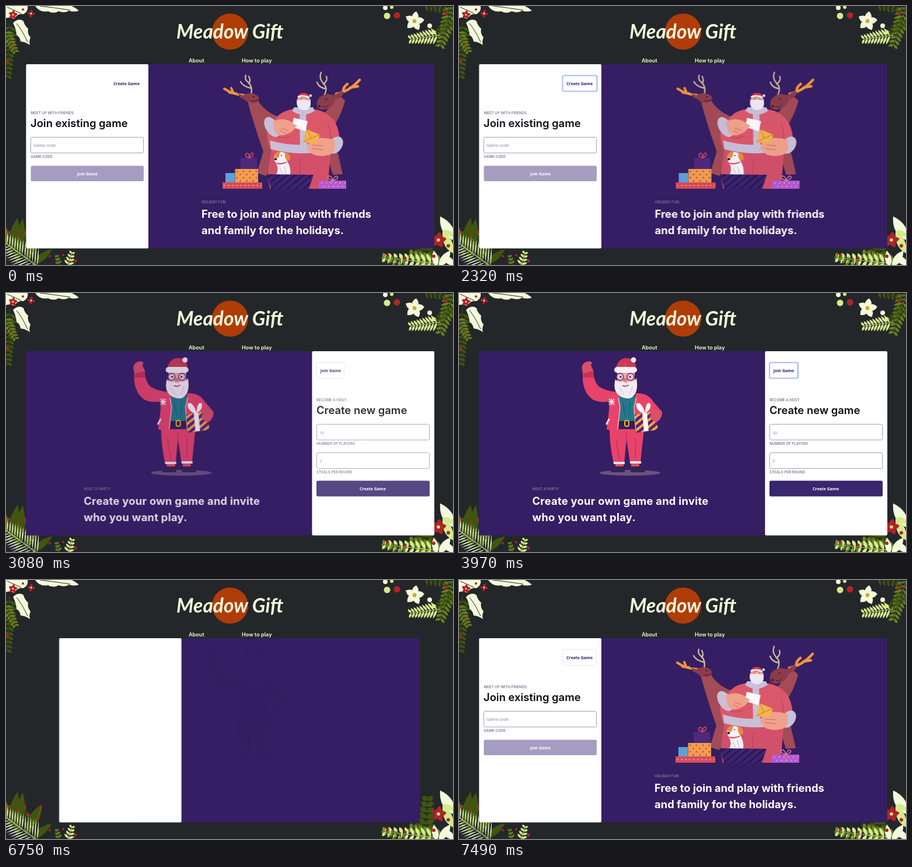
These frames come from a looping animation (766 by 445 pixels, 8420 ms). An HTML page:

```html
<!DOCTYPE html>
<html lang="en">
<head>
<meta charset="utf-8">
<title>Gift game</title>
<style>
html, body { margin: 0; width: 100%; height: 100%; overflow: hidden; background: #242729; }
svg { display: block; width: 766px; height: 445px; }
text { font-family: Inter, sans-serif; }
.nav { font-size: 9.1px; font-weight: 600; fill: #f3fadb; }
.brand { font: italic 700 33.6px Lato, cursive; fill: #f5fadc; }
.tag { font-size: 6.2px; font-weight: 600; fill: #7f7a94; }
.head { font-size: 18.4px; font-weight: 600; fill: #0b0a10; }
.hero { font-size: 18.4px; font-weight: 700; fill: #fff; }
.hero.wide { letter-spacing: .25px; }
.btn { font: 700 7px "Noto Sans", sans-serif; text-anchor: middle; fill: #2f1d63; }
.btn.on { fill: #fff; }
.val { font: 7.2px "Noto Sans", sans-serif; fill: #8a8499; }
.field { fill: #fff; stroke: #a39eb5; }
.edge { fill: none; stroke: #e6e4ee; }
.ring { fill: none; stroke: #a9bbfa; stroke-width: 2; }

.panel { animation: slide 8420ms cubic-bezier(.15,0,.1,1) infinite; }
.white { --to: 490px; }
.purple { --to: -210px; }
.join, .create { --in: 0px; --out: 0px; animation: join 8420ms cubic-bezier(0,0,.2,1) infinite; }
.create { animation-name: create; }
.art { --in: 50px; --out: 50px; }
.create.art { --out: -50px; }
.edge.first { animation: edge 8420ms linear infinite; }
.ring { animation: ring1 8420ms linear infinite; }
.ring.second { animation-name: ring2; }

@keyframes slide {
  0%, 27.553% { transform: translateX(0); }
  36.01%, 75.57% { transform: translateX(var(--to)); }
  84.027%, 100% { transform: translateX(0); }
}
@keyframes join {
  0%, 27.553% { opacity: 1; transform: translateX(0); }
  32.66% { opacity: 0; transform: translateX(var(--out)); }
  80.309% { opacity: 0; transform: translateX(var(--in)); }
  88.741%, 100% { opacity: 1; transform: translateX(0); }
}
@keyframes create {
  0%, 32.28% { opacity: 0; transform: translateX(var(--in)); }
  40.713%, 75.57% { opacity: 1; transform: translateX(0); }
  80.677%, 100% { opacity: 0; transform: translateX(var(--out)); }
}
@keyframes edge { 0%, 6.295% { opacity: 0; } 8.67%, 100% { opacity: 1; } }
@keyframes ring1 { 0%, 6.295% { opacity: 0; } 8.67%, 50% { opacity: 1; } 50.01%, 100% { opacity: 0; } }
@keyframes ring2 { 0%, 45.487% { opacity: 0; } 47.15%, 90% { opacity: 1; } 90.01%, 100% { opacity: 0; } }
</style>
</head>
<body>
<svg viewBox="0 0 766 445">
  <defs>
    <pattern id="dots" width="11" height="11" patternUnits="userSpaceOnUse" x="393" y="281">
      <path fill="#f0a04b" d="M0 0h11v11H0z"/><circle cx="3" cy="3" r="1.6" fill="#d64a5e"/><circle cx="8.5" cy="8.5" r="1.6" fill="#d64a5e"/>
    </pattern>
    <pattern id="stripes" width="9" height="9" patternUnits="userSpaceOnUse" patternTransform="rotate(50)">
      <path fill="#f3b21f" d="M0 0h9v9H0z"/><path fill="#5a1f8f" d="M0 0h5v9H0z"/>
    </pattern>
    <pattern id="wrap" width="9" height="9" patternUnits="userSpaceOnUse" patternTransform="rotate(50)">
      <path fill="#3d2470" d="M0 0h9v9H0z"/><path fill="#271550" d="M0 0h2.5v9H0z"/>
    </pattern>
  </defs>

  <g id="plants"></g>
  <path d="M34.5 100V417M733.5 100V417" stroke="#2d302b"/>
  <circle cx="384" cy="44" r="31" fill="#b03c08"/>
  <text class="brand" x="292" y="56">Meadow Gift</text>
  <text class="nav" x="313" y="97">About</text>
  <text class="nav" x="404" y="97">How to play</text>

  <g class="panel purple">
    <rect x="244" y="100" width="489.600" height="316.600" rx="2" fill="#351e63"/>

    <g class="join art">
      <!-- antlers -->
      <g fill="none" stroke-linecap="round" stroke-width="2.4">
        <path stroke="#c9b49c" d="M420 153Q423 138 415 131Q408 126 411 119M416 133Q420 128 416 121M419 141Q406 138 402 130"/>
        <path stroke="#ef9440" stroke-width="4" d="M408 153Q390 153 374 142M394 150L383 149M389 148L386 141"/>
        <path stroke="#c9b49c" d="M546 152Q552 140 543 132Q536 124 540 114M544 134Q552 128 549 121M547 142Q536 140 533 131"/>
        <path stroke="#ef9440" stroke-width="4.5" d="M566 151Q588 147 606 127M578 146Q578 139 585 134M590 140L603 138"/>
      </g>
      <!-- reindeer -->
      <path fill="#a34b57" d="M413 160L432 163Q443 181 466 190L458 262L446 292L430 287L441 250Q425 205 413 160Z"/>
      <path fill="#8b3c4a" d="M398 150Q405 156 412 151Q424 147 433 156Q435 165 424 167Q412 166 408 160Q399 158 398 150Z"/>
      <path fill="#a34b57" d="M557 158Q572 150 581 163Q574 190 558 212L570 258L577 289L560 290L545 240L538 188Q550 182 553 174Z"/>
      <path fill="#8b3c4a" d="M533 165Q535 154 551 151Q561 154 565 152Q574 145 579 148Q576 158 565 160Q561 174 549 177Q536 180 533 173Z"/>
      <g fill="#32182f"><circle cx="424" cy="156" r="1.2"/><circle cx="549" cy="160" r="1.3"/><circle cx="537" cy="172" r="2"/></g>
      <path fill="none" stroke="#32182f" d="M420 163Q427 165 432 161M542 173Q549 175 553 170"/>
      <!-- large figure -->
      <path fill="#d2506a" d="M455 244L448 290L452 314H551L557 244Z"/>
      <path fill="#db586b" d="M493 177Q470 180 459 197L447 218Q449 242 456 250H566Q578 225 563 198Q550 180 526 177Z"/>
      <path fill="none" stroke="#b83d59" d="M551 202Q558 217 555 233M462 224Q474 229 487 224M505 262Q502 285 504 313"/>
      <path fill="#c9bfd8" d="M452 231Q503 246 561 231L563 245Q510 261 454 246Z"/>
      <path fill="#c9bfd8" d="M503 181h11l2 64h-12z"/>
      <path fill="#c9bfd8" d="M490 180Q509 194 529 180L526 174H494Z"/>
      <path fill="#f0a18b" d="M500 157h20v14h-20z"/>
      <path fill="#eee8f3" d="M499 159Q500 164 504 161H516Q520 165 521 158Q526 179 510 179Q495 177 499 159Z"/>
      <path fill="#d23b4e" d="M500 156Q503 147 515 150L522 155Z"/>
      <path fill="none" stroke="#f4f0f6" stroke-width="3" stroke-linecap="round" d="M501 156Q510 153 519 157"/>
      <circle cx="522" cy="154" r="2.2" fill="#f4f0f6"/>
      <g fill="#32182f"><circle cx="506" cy="160" r=".8"/><circle cx="515" cy="160" r=".8"/></g>
      <ellipse cx="456" cy="208" rx="11" ry="19" transform="rotate(-32 456 208)" fill="#c9bfd8"/>
      <path fill="#f0a18b" d="M457 199Q473 190 489 199L499 205Q493 216 479 221Q468 225 461 217Z"/>
      <path fill="#fbf9fd" d="M493 192L517 198L513 215L490 208Z"/>
      <path fill="#f0a18b" d="M484 197L499 206L491 213L479 207Z"/>
      <ellipse cx="565" cy="239" rx="11" ry="16" transform="rotate(32 565 239)" fill="#c9bfd8"/>
      <path fill="#f0a18b" d="M520 229Q543 224 562 230Q567 245 558 254Q542 261 526 255L516 245Z"/>
      <path fill="#f2b44d" d="M515 212L538 221L533 236L509 234Z"/>
      <path fill="none" stroke="#c87520" d="M515 212L523 227L538 221M523 227L509 234"/>
      <path fill="none" stroke="#c26967" stroke-linecap="round" d="M472 210L484 214M470 214L479 219M526 239L543 240M525 245L542 247"/>
      <!-- gifts and dog -->
      <path fill="#50297b" d="M402 261h28v19h-28z"/>
      <path fill="none" stroke="#d64a5e" stroke-width="1.500" d="M417 261Q407 258 412 253Q416 251 417 261Q419 250 423 253Q426 257 417 261"/>
      <path fill="#609fd8" d="M376 287h16v16h-16z"/>
      <path fill="url(#dots)" d="M392.5 280h39.5v23h-39.5z"/>
      <path fill="#d64a5e" d="M371 303h68v11h-68z"/>
      <path fill="none" stroke="#eb9a65" stroke-width="2" stroke-dasharray="3 4" d="M373 308.5H438"/>
      <path fill="#f5f2f7" d="M461 254Q471 247 482 255L481 265Q489 277 487 290H463Q468 281 463 270Q457 264 461 254Z"/>
      <path fill="#e88b3b" d="M478 252Q488 252 487 264Q481 269 478 259Z"/>
      <path fill="#e88b3b" d="M461 254Q466 248 470 251L467 261L460 260Z"/>
      <ellipse cx="462" cy="263" rx="2.5" ry="2" fill="#251633"/><circle cx="472" cy="257" r="1" fill="#251633"/>
      <path fill="none" stroke="#db4657" stroke-width="2" d="M464 270Q472 273 481 268"/>
      <path fill="none" stroke="#b9adc9" d="M469 278L474 288M477 276L480 289"/>
      <path fill="url(#wrap)" d="M447 289L527 290L519 314H454Z"/>
      <path fill="#b45bd6" d="M536 300h47v14h-47z"/>
      <path fill="none" stroke="#f1a36a" stroke-width="2" stroke-dasharray="2 6" d="M540 304H582M544 310H582"/>
      <path fill="none" stroke="#e08295" stroke-width="1.500" d="M560 300Q548 296 553 292Q558 291 560 300Q564 290 568 293Q571 297 560 300"/>
      <text class="tag" x="335" y="338.5">HOLIDAY FUN</text>
      <text class="hero" x="335" y="364">Free to join and play with friends</text>
      <text class="hero" x="335" y="391.5">and family for the holidays.</text>
    </g>

    <g transform="translate(210)"><g class="create art">
      <ellipse cx="293" cy="309" rx="52" ry="5" fill="#69537f"/>
      <path fill="#e8436a" d="M258 234H317L311 291H293L287 252L283 293H265Q258 260 258 234Z"/>
      <path fill="none" stroke="#b72a55" d="M287 240V254M269 250L275 287M303 250L302 284"/>
      <path fill="#f2e4ee" d="M265 290h19v4h-19zM293 289h19v4h-19z"/>
      <path fill="#d9506a" d="M268 294h14v4h-14zM295 293h14v5h-14z"/>
      <path fill="#35244f" d="M267 298h17v10h-24q0-6 7-10zM294 298h16q8 4 9 10h-25z"/>
      <path fill="#e8436a" d="M266 184Q244 191 229 183Q210 169 212 138L230 134Q231 153 240 161Q254 169 270 170Z"/>
      <path fill="#c72f59" d="M213 140Q226 130 230 136L231 146Q221 144 213 146Z"/>
      <path fill="#d9506a" d="M211 133Q209 123 216 119Q225 115 228 120L226 124L231 135Q220 135 213 139Z"/>
      <path fill="#21798a" d="M270 177H307L302 224H273Z"/>
      <path fill="none" stroke="#175d70" d="M281 187L285 212M294 186L291 212"/>
      <path fill="#312142" d="M271 220H304V229H271Z"/>
      <path fill="#e8436a" d="M258 176Q264 172 274 172L277 196L272 238Q261 237 253 234L257 203Z"/>
      <path fill="#e8436a" d="M303 172Q325 172 333 187Q342 197 348 204Q349 216 338 221L322 215L319 238H302L300 196Z"/>
      <path fill="none" stroke="#f7b6c2" stroke-width="1.500" d="M273 180L276 196L272 234M304 180L300 196L303 234"/>
      <path fill="none" stroke="#fae8ef" stroke-width="1.6" d="M256 187H267M261.500 181V193M257 182L266 192M266 182L257 192"/>
      <path fill="none" stroke="#fbd7df" stroke-width="3" stroke-linecap="round" d="M257 217L253 225"/>
      <rect x="284" y="219" width="7" height="10" rx="3" fill="none" stroke="#f2b435" stroke-width="2"/>
      <path fill="url(#stripes)" d="M301 209L337 203L341 235L304 240Z"/>
      <path fill="#fbf6fa" d="M314 207l8-1 3 31-8 1zM317 208Q302 201 304 190Q312 185 319 206Q320 185 328 190Q330 201 317 208Z"/>
      <path fill="#d9506a" d="M331 202Q341 197 347 205Q347 219 338 222Q330 220 327 213Z"/>
      <path fill="#efaaa5" d="M271 137H301V157H271Z"/>
      <path fill="#f3eaf2" d="M268 148Q273 155 280 152L286 155L292 152Q300 154 304 146Q309 174 293 181Q282 182 274 176Q263 167 268 148Z"/>
      <path fill="none" stroke="#cfbccf" d="M275 163Q278 170 283 174M297 160Q297 168 291 174"/>
      <path fill="#ce3a52" d="M269 132Q270 116 283 112Q293 111 300 116Q304 124 303 132Z"/>
      <path fill="none" stroke="#a92c49" d="M290 118Q297 118 300 124"/>
      <rect x="266" y="127" width="39" height="10" rx="5" fill="#f6eef4"/>
      <circle cx="299" cy="115" r="4.500" fill="#f6eef4"/>
      <path fill="none" stroke="#ca4f71" d="M285 120V126M282 123H288"/>
      <g fill="#d9c9e2" stroke="#762e52" stroke-width="1.500"><circle cx="276" cy="144" r="6"/><circle cx="294" cy="144" r="6"/></g>
      <circle cx="277" cy="144" r="1.5" fill="#29172f"/><circle cx="293" cy="144" r="1.5" fill="#29172f"/>
      <ellipse cx="285" cy="149" rx="4" ry="3" fill="#d87580"/>
      <path fill="none" stroke="#863653" stroke-width="1.5" d="M280 159Q286 162 291 158"/>
      <text class="tag" x="125.500" y="338.5">HOST A PARTY</text>
      <text class="hero wide" x="125.500" y="364">Create your own game and invite</text>
      <text class="hero wide" x="125.500" y="391.5">who you want play.</text>
    </g></g>
  </g>

  <g class="panel white">
    <rect x="34.400" y="100" width="209.600" height="316.600" rx="2" fill="#fff"/>
    <g class="join">
      <rect class="edge first" x="177.5" y="119.5" width="58" height="27" rx="2.5"/>
      <rect class="ring" x="177.5" y="119.5" width="59" height="27" rx="2.5"/>
      <text class="btn" x="206.500" y="135.7">Create Game</text>
      <text class="tag" x="42.500" y="186">MEET UP WITH FRIENDS</text>
      <text class="head" x="42" y="208">Join existing game</text>
      <rect class="field" x="42.500" y="225.5" width="193" height="27" rx="2"/>
      <text class="val" x="47" y="242">Game code</text>
      <text class="tag" x="42.500" y="261">GAME CODE</text>
      <rect x="42.500" y="274.5" width="193.500" height="26.500" rx="2.5" fill="#a69cc1"/>
      <text class="btn on" x="139.500" y="290.500">Join Game</text>
    </g>
    <g transform="translate(-490)"><g class="create">
      <rect class="edge" x="531.5" y="119.5" width="48" height="27" rx="2.5"/>
      <rect class="ring second" x="532" y="119.5" width="49" height="27" rx="2.5"/>
      <text class="btn" x="556.500" y="135.7">Join Game</text>
      <text class="tag" x="532" y="186">BECOME A HOST</text>
      <text class="head" x="532" y="208">Create new game</text>
      <rect class="field" x="532.5" y="225.5" width="193" height="27" rx="2"/>
      <text class="val" x="537" y="242.500">10</text>
      <text class="tag" x="532" y="261">NUMBER OF PLAYERS</text>
      <rect class="field" x="532.5" y="274.5" width="193" height="27" rx="2"/>
      <text class="val" x="537" y="291">2</text>
      <text class="tag" x="532" y="309.5">STEALS PER ROUND</text>
      <rect x="532" y="322.5" width="194" height="27" rx="2.5" fill="#38266f"/>
      <text class="btn on" x="628.500" y="339">Create Game</text>
    </g></g>
  </g>
</svg>
<script>
const olive = '#3f5510', moss = '#64801f', lime = '#d5ea8b', cream = '#f3fadb', red = '#b4212b', night = '#242729';

const leaf = (x, y, a, l, w, c) =>
  `<path fill="${c}" transform="translate(${x} ${y}) rotate(${a})" d="M0 0Q${l * .45} ${-w} ${l} 0Q${l * .45} ${w} 0 0"/>`;

const dot = (x, y, r, c) => `<circle cx="${x}" cy="${y}" r="${r}" fill="${c}"/>`;

const shape = (d, c) => `<path d="${d}" fill="${c}"/>`;

const line = (d, c, w = 1) => `<path d="${d}" fill="none" stroke="${c}" stroke-width="${w}"/>`;

// A stem with n pairs of leaves that shrink toward the tip.
const fern = (x, y, a, l, n, s, w, c) => {
  let out = line(`M0 0H${l}`, c);
  for (let i = 1; i <= n; i++) {
    const size = s * (1 - .5 * i / n);
    for (const side of [-58, 58]) out += leaf(l * i / n, 0, side, size, w, c);
  }
  return `<g transform="translate(${x} ${y}) rotate(${a})">${out}</g>`;
};

const flower = (x, y, r, n, c, mid) => {
  let out = '';
  for (let i = 0; i < n; i++) out += leaf(x, y, i * 360 / n - 80, r, r * .65, c);
  return out + dot(x, y, r * .2, mid);
};

const topLeft =
  fern(6, 28, 92, 92, 12, 17, 5, olive) + fern(-4, 40, 62, 42, 7, 14, 4, moss) +
  shape('M0 0H37Q39 9 30 14Q20 12 14 22Q6 18 0 21Z', cream) +
  shape('M50 0Q58 12 72 9Q82 14 90 9Q101 13 108 8Q116 11 125 8Q118 2 112 0Z', cream) +
  shape('M12 29Q22 20 30 26Q32 34 38 39Q36 47 42 54Q39 61 41 67Q32 61 25 61Q24 53 18 50Q18 41 12 29Z', cream) +
  line('M58 0Q83 3 110 7M18 30Q28 42 37 62M2 2Q16 8 26 13', night) +
  flower(43, 13, 7, 4, red, cream) + flower(12, 15, 8, 5, red, lime) +
  dot(3, 95, 2.5, red) + dot(10, 65, 2, red) + dot(29, 6, 2, red);

const topRight =
  fern(768, -4, 108, 74, 10, 20, 5, moss) + fern(768, 22, 140, 36, 6, 14, 4, olive) +
  fern(712, -4, 15, 46, 6, 13, 4, olive) + fern(744, 50, 172, 50, 9, 18, 4, lime) +
  flower(700, 26, 17, 5, cream, '#d0a83e') +
  dot(653, 17, 5.5, lime) + dot(670, 16, 5.5, red) + dot(650, 3, 4, cream) + dot(661, 2, 3, lime) +
  dot(726, 34, 4, cream) + dot(733, 45, 3.5, lime) + dot(754, 13, 3, red);

const bottomLeft =
  leaf(6, 430, -78, 68, 16, olive) + leaf(18, 442, -82, 78, 18, olive) + leaf(32, 440, -62, 62, 18, olive) +
  leaf(44, 445, -38, 44, 12, olive) + leaf(-4, 418, -95, 50, 20, moss) +
  fern(58, 450, 216, 80, 15, 34, 1.8, cream) + fern(105, 450, -73, 26, 4, 12, 4, lime) + fern(92, 448, -105, 18, 3, 8, 4, moss) +
  line('M36 445Q42 414 33 391M40 430Q54 412 60 393M37 419Q27 408 20 396', moss) +
  dot(33, 389, 2.5, red) + dot(60, 391, 2.5, red) + dot(38, 404, 3, red) + dot(55, 408, 2, red) +
  dot(20, 395, 2, red) + dot(5, 389, 2.5, red) + dot(98, 428, 2, red) + dot(119, 438, 2.5, red) + dot(75, 430, 2, red);

const bottomRight =
  fern(718, 440, -86, 62, 6, 22, 9, olive) + fern(752, 448, -160, 60, 7, 20, 7, moss) +
  fern(738, 442, 186, 88, 9, 19, 6, lime) + fern(690, 450, 205, 46, 6, 13, 4, moss) +
  leaf(768, 403, -120, 48, 18, cream) + leaf(766, 425, -115, 42, 14, lime) + leaf(768, 395, -155, 22, 9, lime) +
  leaf(742, 448, -55, 34, 13, cream) + leaf(738, 448, -100, 28, 11, cream) +
  flower(741, 402, 14, 5, red, lime) + leaf(768, 445, -140, 24, 12, cream) +
  dot(684, 433, 2.5, red) + dot(654, 428, 2.5, red) + dot(733, 430, 3, red) + dot(758, 412, 3, red);

document.getElementById('plants').innerHTML = topLeft + topRight + bottomLeft + bottomRight;
</script>
</body>
</html>
```
